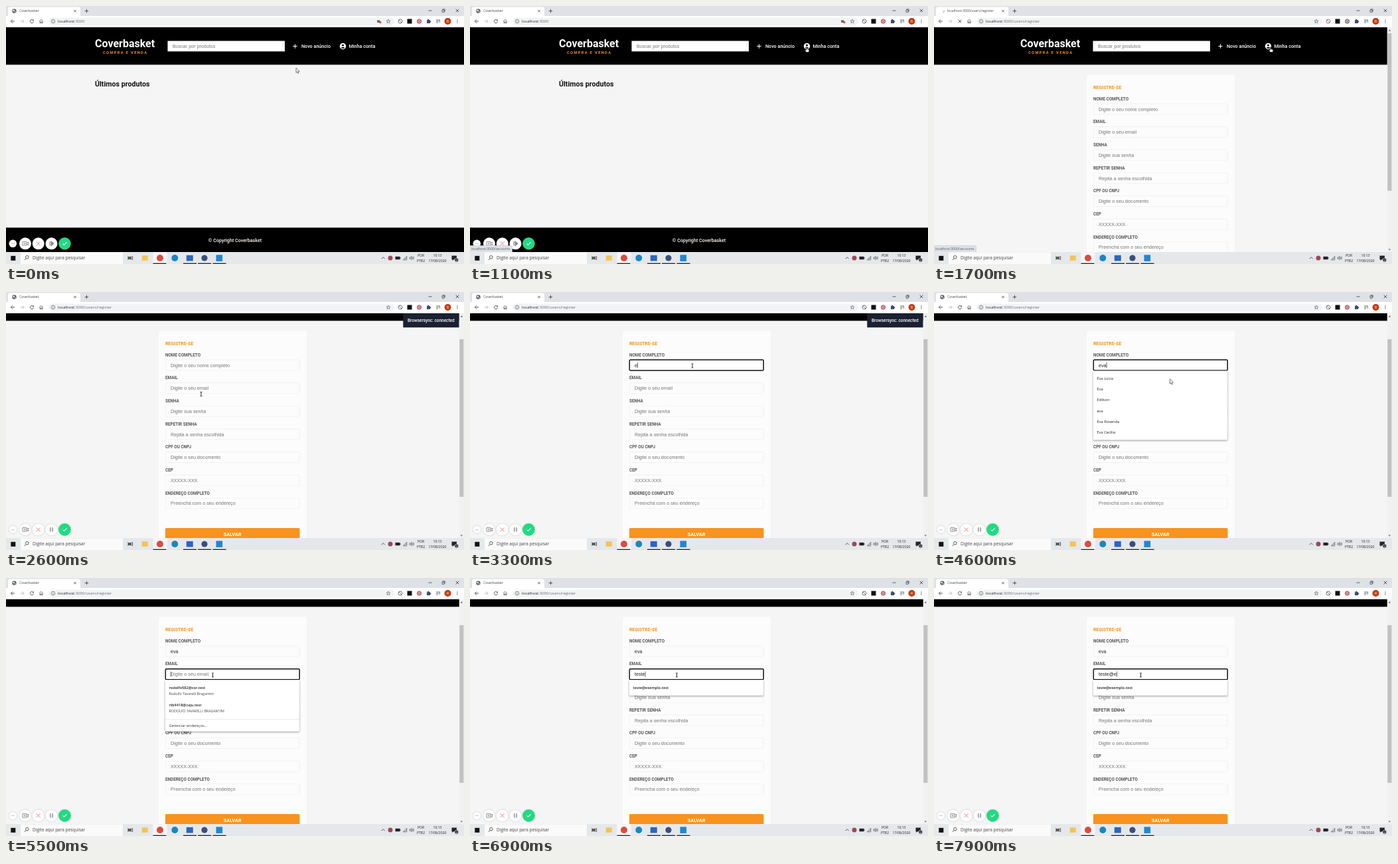
Recreate the animation shown at these times as an HTML page with a canvas. Size 690 by 388 pixels, loop 8 s.

```html
<!DOCTYPE html>
<html lang="pt-BR">
<head>
<meta charset="utf-8">
<title>Coverbasket</title>
<style>
html, body { margin: 0; width: 100%; height: 100%; overflow: hidden; background: #fff; }
canvas { display: block; width: 690px; height: 388px; }
</style>
</head>
<body>
<canvas id="stage"></canvas>
<script>
const W = 690, H = 388, LOOP = 8000;
const canvas = document.getElementById('stage');
const ctx = canvas.getContext('2d');
const dpr = window.devicePixelRatio || 1;
canvas.width = W * dpr;
canvas.height = H * dpr;

const PAGE = 'Roboto, sans-serif';
const UI = '"Open Sans", sans-serif';
const FIELD = '"Liberation Sans", Arial, sans-serif';
const ORANGE = '#f7931e';
const BRAND = 'Coverbasket';

// Key moments in ms
const HOVER = 1000, NAVIGATE = 1500, LOADED = 2000, SCROLL = [2300, 2500];
const NAME_CLICK = 2900, NAME_LIST = 3400, NAME_DONE = 4800, EMAIL_CLICK = 5200;
const NOTICE_END = 3500, PREVIEW = [3600, 4100];
const NAME_KEYS = [3300, 4200, 4500];
const EMAIL_KEYS = [6200, 6300, 6400, 6500, 6700, 7300, 7800];

const FIELDS = [
  ['NOME COMPLETO', 'Digite o seu nome completo'],
  ['EMAIL', 'Digite o seu email'],
  ['SENHA', 'Digite sua senha'],
  ['REPETIR SENHA', 'Repita a senha escolhida'],
  ['CPF OU CNPJ', 'Digite o seu documento'],
  ['CEP', 'XXXXX-XXX'],
  ['ENDEREÇO COMPLETO', 'Preencha com o seu endereço']
];
const NAMES = ['Eva Lúcia', 'Eva', 'Edilson', 'eva', 'Eva Rosenda', 'Eva Cecília'];
const CONTACTS = [
  ['rodolfo582@cor.test', 'Rodolfo Tavarelli Bragantim'],
  ['rtb4418@caju.test', 'RODOLFO TAVARELLI BRAGANTIM']
];

// Pointer path: time, x, y
const PATH = [
  [0, 437, 93], [150, 437, 93], [900, 507, 62], [1850, 507, 62],
  [2500, 294, 153.5], [2650, 294, 153.5], [2900, 330, 111], [3300, 335, 111],
  [3600, 359, 129.5], [4500, 359, 129.5], [5100, 311.5, 146], [8000, 311.5, 146]
];

const typed = (word, keys, t) => word.slice(0, keys.filter(k => t >= k).length);
const ease = u => u * u * (3 - 2 * u);
const progress = (t, [a, b]) => ease(Math.min(1, Math.max(0, (t - a) / (b - a))));

function rect(x, y, w, h, fill) {
  ctx.fillStyle = fill;
  ctx.fillRect(x, y, w, h);
}

function box(x, y, w, h, r, fill, stroke, line = 0.6) {
  ctx.beginPath();
  ctx.roundRect(x, y, w, h, r);
  if (fill) { ctx.fillStyle = fill; ctx.fill(); }
  if (stroke) { ctx.strokeStyle = stroke; ctx.lineWidth = line; ctx.stroke(); }
}

function circle(x, y, r, fill, stroke, line = 0.9) {
  ctx.beginPath();
  ctx.arc(x, y, r, 0, Math.PI * 2);
  if (fill) { ctx.fillStyle = fill; ctx.fill(); }
  if (stroke) { ctx.strokeStyle = stroke; ctx.lineWidth = line; ctx.stroke(); }
}

function draw(d, x, y, stroke, line = 1, fill) {
  ctx.save();
  ctx.translate(x, y);
  const path = new Path2D(d);
  if (fill) { ctx.fillStyle = fill; ctx.fill(path); }
  if (stroke) { ctx.strokeStyle = stroke; ctx.lineWidth = line; ctx.stroke(path); }
  ctx.restore();
}

// y is the visual middle of the capitals
function text(s, x, y, size, color, font = PAGE, weight = 400, align = 'left', spacing = 0) {
  ctx.font = `${weight} ${size}px ${font}`;
  ctx.letterSpacing = spacing + 'px';
  ctx.textAlign = align;
  ctx.fillStyle = color;
  ctx.fillText(s, x, y + size * 0.36);
}

function panel(y, h) {
  ctx.save();
  ctx.shadowColor = 'rgba(0,0,0,.4)';
  ctx.shadowBlur = 3 * dpr;
  ctx.shadowOffsetY = dpr;
  box(240, y, 202, h, 1, '#fff');
  ctx.restore();
}

function globe(x, y) {
  circle(x, y, 3.2, '#5f6368');
  draw('M-2.4-1.2Q-.8-2.4 .8-1.4L0 .2-1.6.2ZM.4 1L2.2.6 1 2.4Z', x, y, null, 1, '#fff');
}

function browser(t) {
  const register = t >= NAVIGATE, loading = register && t < LOADED;
  rect(0, 0, W, 15.5, '#dee1e6');
  box(3, 1.5, 109, 16, 3, '#fff');
  rect(0, 15, W, 17, '#fff');
  if (loading) {
    const a = t / 140;
    ctx.beginPath();
    ctx.arc(12.5, 7.5, 2.8, a, a + 1.6);
    ctx.strokeStyle = '#777';
    ctx.lineWidth = 0.8;
    ctx.stroke();
  } else globe(12.5, 7.5);
  text(loading ? 'localhost:3000/users/register' : BRAND, 20, 7.5, 5.15, '#45494d', UI);
  draw('M-1.7-1.7L1.7 1.7M1.7-1.7L-1.7 1.7', 104, 7.5, '#444', 0.8);
  draw('M-2.7 0H2.7M0-2.7V2.7', 121.5, 7.5, '#444', 0.9);
  draw('M-2.5 0H2.5', 639, 7, '#333', 0.8);
  draw('M-2-1H1.2V2.2H-2ZM-1-1V-2.2H2.2V1H1.2', 659, 7, '#333', 0.7);
  draw('M-2.3-2.3L2.3 2.3M2.3-2.3L-2.3 2.3', 680, 7, '#333', 0.8);

  const arrow = 'M3 0H-2.6M0-2.7L-2.7 0 0 2.7';
  draw(arrow, 10, 23, '#50545a', 0.95);
  draw('M-3 0H2.6M0-2.7L2.7 0 0 2.7', 24.5, 23, '#bbbec2', 0.9);
  if (loading) draw('M-2.3-2.3L2.3 2.3M2.3-2.3L-2.3 2.3', 39, 23, '#50545a', 0.95);
  else {
    draw('M2.2-1.4A2.6 2.6 0 1 0 2.5.8', 39, 23, '#50545a', 0.95);
    draw('M2.9-3V-.4H.3Z', 39, 23, null, 1, '#50545a');
  }
  draw('M-3 .2L0-2.6 3 .2M-2 0V2.7H-.7V.8H.7V2.7H2V0', 53, 23, '#50545a', 0.8);
  box(64, 17.5, 521, 11.5, 5.7, '#f1f3f4');
  circle(71, 23, 2.8, null, '#5f6368', 0.7);
  draw('M0-.4V1.6M0-1.6V-1', 71, 23, '#5f6368', 0.7);
  text('localhost', 78, 23, 6, '#202124', UI);
  const port = 78 + ctx.measureText('localhost').width;
  text(':3000' + (register ? '/users/register' : ''), port, 23, 6, '#6b7075', UI);

  if (!register) {
    box(559, 21.3, 4.4, 3.8, 1, '#666');
    circle(564, 24.6, 1.6, '#d44');
  }
  draw('M0-3L.8-.9 3-.8 1.3.6 1.9 2.7 0 1.5-1.9 2.7-1.3.6-3-.8-.8-.9Z', 576, 23, '#5f6368', 0.7);
  circle(594, 23, 3, null, loading ? '#915a78' : '#5c6068');
  draw('M-2-2L2 2', 594, 23, loading ? '#915a78' : '#5c6068', 0.8);
  rect(604.5, 19.5, 7, 7, '#111');
  circle(622.5, 23, 3.5, loading ? '#777' : '#c9545c');
  circle(622.5, 23, 1.6, null, '#fff', 0.7);
  box(634, 21, 5, 5, 0.6, '#3f4e70');
  circle(636.3, 20.9, 1.2, '#3f4e70');
  circle(639, 23.4, 1.2, '#3f4e70');
  draw('M-3-2H3M-3 0H1M-3 2H0M2.4-1.8V1.8', 651, 23, '#50545a', 0.8);
  circle(665.5, 23, 5, '#c8380c');
  text('R', 665.5, 23, 5, '#fff', PAGE, 400, 'center');
  for (const dy of [-2, 0, 2]) circle(680, 23 + dy, 0.65, '#50545a');
}

function header(dx, dy) {
  ctx.save();
  ctx.translate(dx, dy);
  rect(-5, 32, 700, 56.3, '#000');
  text(BRAND, 134, 56.7, 16, '#fff', PAGE, 700);
  text('COMPRA E VENDA', 146, 70.3, 5.8, ORANGE, PAGE, 700, 'left', 1.3);
  rect(243.5, 52.5, 176.5, 15.8, '#fff');
  text('Buscar por produtos', 251, 60.2, 7.15, '#757575', FIELD);
  draw('M-3.2 0H3.2M0-3.2V3.2', 435.5, 60.5, '#fff', 1);
  text('Novo anúncio', 445, 60.5, 7.18, '#fff', PAGE, 500);
  circle(507.5, 60.5, 4.7, '#fff');
  circle(507.5, 59, 1.5, '#000');
  draw('M-2.8 2Q0 0 2.8 2Q0 4.8-2.8 2Z', 507.5, 60.7, null, 1, '#000');
  text('Minha conta', 516.5, 60.5, 7.18, '#fff', PAGE, 500);
  ctx.restore();
}

function home() {
  header(0, 0);
  text('Últimos produtos', 134, 117, 10.7, '#111', PAGE, 700);
  rect(0, 333.3, W, 37, '#000');
  text('© Copyright ' + BRAND, 345, 352, 7.18, '#fff', PAGE, 500, 'center');
}

function caret(value, y, t, since) {
  if ((t - since) % 1000 >= 500) return;
  ctx.font = `400 7.18px ${FIELD}`;
  ctx.letterSpacing = '0px';
  rect(248 + ctx.measureText(value).width + 0.2, y - 4, 0.6, 8, '#000');
}

function form(t, scroll) {
  const name = typed('eva', NAME_KEYS, t);
  const mail = typed('teste@e', EMAIL_KEYS, t);
  const preview = t >= PREVIEW[0] && t < PREVIEW[1];
  const values = [name, mail, '', '', '', preview ? '24680-000' : '', preview ? 'Laranjais' : ''];
  const focus = t >= EMAIL_CLICK ? 1 : t >= NAME_CLICK ? 0 : -1;

  header(-4, -scroll);
  box(230, 103.5 - scroll, 223, 340, 3, '#fcfcfc');
  text('REGISTRE-SE', 240, 123 - scroll, 6.85, ORANGE, PAGE, 700);
  FIELDS.forEach(([label, hint], i) => {
    const y = 155 + 34.65 * i - scroll, filled = preview && i > 4;
    text(label, 240, y - 15.6, 6.35, '#555', PAGE, 700);
    const active = i === focus;
    box(240.3, y - 8, 201.9, 16, active ? 1.5 : 1, filled ? '#e4edfb' : active ? '#fff' : '#fcfcfc',
      active ? '#111' : filled ? '#e0e6ef' : '#ebebeb', active ? 1.5 : 0.6);
    text(values[i] || hint, 248, y, filled ? 6.1 : 7.18, values[i] ? '#222' : '#757575', FIELD);
    if (active) {
      const keys = (i ? EMAIL_KEYS : NAME_KEYS).filter(k => k <= t);
      caret(values[i], y, t, keys.length ? keys[keys.length - 1] : i ? EMAIL_CLICK : NAME_CLICK);
    }
  });
  box(240, 400 - scroll, 202.5, 19, 1.5, ORANGE);
  text('SALVAR', 341.2, 409.3 - scroll, 7.4, '#fff', PAGE, 700, 'center');
}

function suggestions(t) {
  if (t >= NAME_LIST && t < NAME_DONE) {
    panel(118.5, 104);
    NAMES.forEach((s, i) => text(s, 245.5, 130 + 16.18 * i, 5.7, '#222', UI, 500));
  } else if (t >= EMAIL_CLICK + 100 && t < EMAIL_KEYS[0]) {
    panel(153.2, 77.6);
    CONTACTS.forEach(([mail, owner], i) => {
      text(mail, 245.5, 164.5 + 26 * i, 5.6, '#222', UI, 600);
      text(owner, 245.5, 174.2 + 26 * i, 5.3, '#444', UI);
    });
    rect(240, 212, 202, 0.6, '#ddd');
    text('Gerenciar endereços...', 245.5, 222, 5.5, '#333', UI);
  } else if (t >= EMAIL_KEYS[0]) {
    panel(153.2, 23.6);
    text('teste@exemplo.test', 245.5, 164.5, 5.6, '#222', UI, 600);
  }
}

function scrollbar(scroll) {
  rect(682.7, 32, 7.3, 338, '#f1f1f1');
  rect(683.3, 41 + scroll * 2 / 3, 6, 237, '#c1c1c1');
  draw('M-1.7 1L0-1 1.7 1Z', 686.3, 36.5, null, 1, '#555');
  draw('M-1.7-1L0 1 1.7-1Z', 686.3, 366.5, null, 1, '#666');
}

function recorder(resume) {
  ctx.save();
  ctx.shadowColor = 'rgba(0,0,0,.25)';
  ctx.shadowBlur = 2 * dpr;
  circle(10.3, 357.3, 5.8, '#fff');
  for (const x of [29, 48.7, 68.5]) circle(x, 357.3, 9, '#fff');
  circle(88.4, 357.3, 9.2, '#1edc82');
  ctx.restore();
  for (const dx of [-2, 0, 2]) circle(10.3 + dx, 357.3, 0.55, '#777');
  draw('M-4.2-2.8H2V2.8H-4.2ZM2-.8L4.5-2.3V2.3L2 .8', 29, 357.3, '#777', 0.8);
  circle(28, 357.3, 1.1, null, '#777', 0.7);
  draw('M-3-3L3 3M3-3L-3 3', 48.7, 357.3, '#f08080', 1);
  if (resume) draw('M-2.3-3.2V3.2M-.2-3V3L3.2 0Z', 68.5, 357.3, '#777', 1.1, '#999');
  else draw('M-1.6-3.2V3.2M1.6-3.2V3.2', 68.5, 357.3, '#777', 1.2);
  draw('M-3 .2L-.9 2.2 3.2-2.2', 88.4, 357.3, '#fff', 1.2);
}

function taskbar() {
  rect(0, 370, W, 18, '#e5e8eb');
  rect(7.3, 375.8, 7, 7, '#111');
  rect(22, 370.5, 154, 17.5, '#fafafa');
  circle(31.8, 377.7, 2.3, null, '#333', 0.8);
  draw('M0 0L-2.5 2.7', 30.2, 379.4, '#333', 0.8);
  text('Digite aqui para pesquisar', 40, 379, 6.5, '#444', UI);
  draw('M-3.5-2.7V-1.5H1.4V-2.7M-3.5 2.7V1.5H1.4V2.7M-3.5-.5H1.4V.6H-3.5ZM3.2-3V3', 187.3, 379, '#333', 0.8);
  rect(221.5, 370, 21, 18, '#f5f6f7');
  rect(204.8, 375.2, 9, 7.6, '#f0c455');
  circle(232, 379, 5, '#df4a3c');
  circle(254.3, 379, 5, '#1787c5');
  rect(271.8, 374.8, 10, 8.6, '#2a66c0');
  circle(299, 379, 4.6, '#3c4f78');
  rect(316.5, 374.3, 9.6, 9.6, '#2088d0');
  for (const x of [221.5, 267, 289, 311.5]) rect(x, 386.6, 20, 1.4, '#30343a');

  draw('M-2.5 1.2L0-1.3 2.5 1.2', 568.3, 379, '#333', 0.8);
  circle(579, 379, 3.5, '#9c4955');
  rect(586.5, 376.8, 7, 4.4, '#222');
  rect(593.5, 378, 0.9, 2, '#222');
  draw('M-2.8 2.8L2.8-2.8V2.8ZM-.8 2.6L2.7-.6', 601, 379, '#555', 0.7);
  draw('M-3-1H-1.6L0-2.5V2.5L-1.6 1H-3ZM1.3-1.5Q2.5 0 1.3 1.5M2.5-2.5Q4.4 0 2.5 2.5', 611, 379, '#444', 0.7);
  const label = (s, x, y) => text(s, x, y, 5.1, '#222', UI, 400, 'center');
  label('POR', 625, 375.5);
  label('PTB2', 625, 383.3);
  label('10:13', 650, 375.5);
  label('17/08/2020', 650, 383.3);
  draw('M-4-3.5H3.5V2.3H-1.2L-3 4V2.3H-4Z', 675.5, 379, null, 1, '#222');
  circle(678.8, 382, 2.9, '#333', '#e5e8eb', 0.6);
  text('2', 678.8, 382, 4.2, '#fff', UI, 400, 'center');
}

function pointer(t) {
  const i = PATH.findIndex((p, n) => n && t <= p[0]);
  const [t0, x0, y0] = PATH[i - 1], [t1, x1, y1] = PATH[i];
  const u = progress(t, [t0, t1]);
  const x = x0 + (x1 - x0) * u, y = y0 + (y1 - y0) * u;
  const hand = t >= 850 && t < 1900;
  const beam = t >= 2350 && t < 3350 || t >= 4950;
  if (hand) {
    draw('M-.7 0Q0-.9 .7 0V2.8L3.4 3.4Q4.1 3.7 3.9 4.8L3.3 7.5H-.3L-2.6 4.5Q-2.3 3.5-.7 4.6Z', x, y, '#111', 0.7, '#fff');
  } else if (beam) {
    draw('M-1.4-3.2Q0-3.2 0-2.5Q0-3.2 1.4-3.2M0-2.5V2.5M-1.4 3.2Q0 3.2 0 2.5Q0 3.2 1.4 3.2', x, y, '#111', 0.9);
  } else {
    draw('M0 0V7.3L1.7 5.8 2.8 8.4 4 7.9 2.9 5.4H5.2Z', x, y, '#444', 0.7, '#fff');
  }
}

function render(t) {
  ctx.setTransform(dpr, 0, 0, dpr, 0, 0);
  rect(0, 0, W, H, '#f5f5f5');
  const register = t >= NAVIGATE, scroll = 45 * progress(t, SCROLL);
  ctx.save();
  ctx.beginPath();
  ctx.rect(0, 32, W, 338);
  ctx.clip();
  if (register) form(t, scroll);
  else home();
  if (t >= LOADED && t < NOTICE_END) {
    rect(598.3, 32, 84.4, 21.3, '#1b2032');
    text('Browsersync: connected', 605, 42.5, 6.45, '#fff', PAGE, 500);
  }
  if (!register || t >= LOADED) recorder(!register);
  if (register) scrollbar(scroll);
  if (t >= HOVER && t < LOADED) {
    box(-2, 360.3, 65.5, 12, 2, '#dee1e6', '#c4c8cc');
    text('localhost:3000/accounts', 2, 365.5, 5.2, '#555a60', UI);
  }
  ctx.restore();
  browser(t);
  taskbar();
  suggestions(t);
  pointer(t);
}

const start = performance.now();
function tick() {
  render((performance.now() - start) % LOOP);
  requestAnimationFrame(tick);
}
tick();
</script>
</body>
</html>
```
